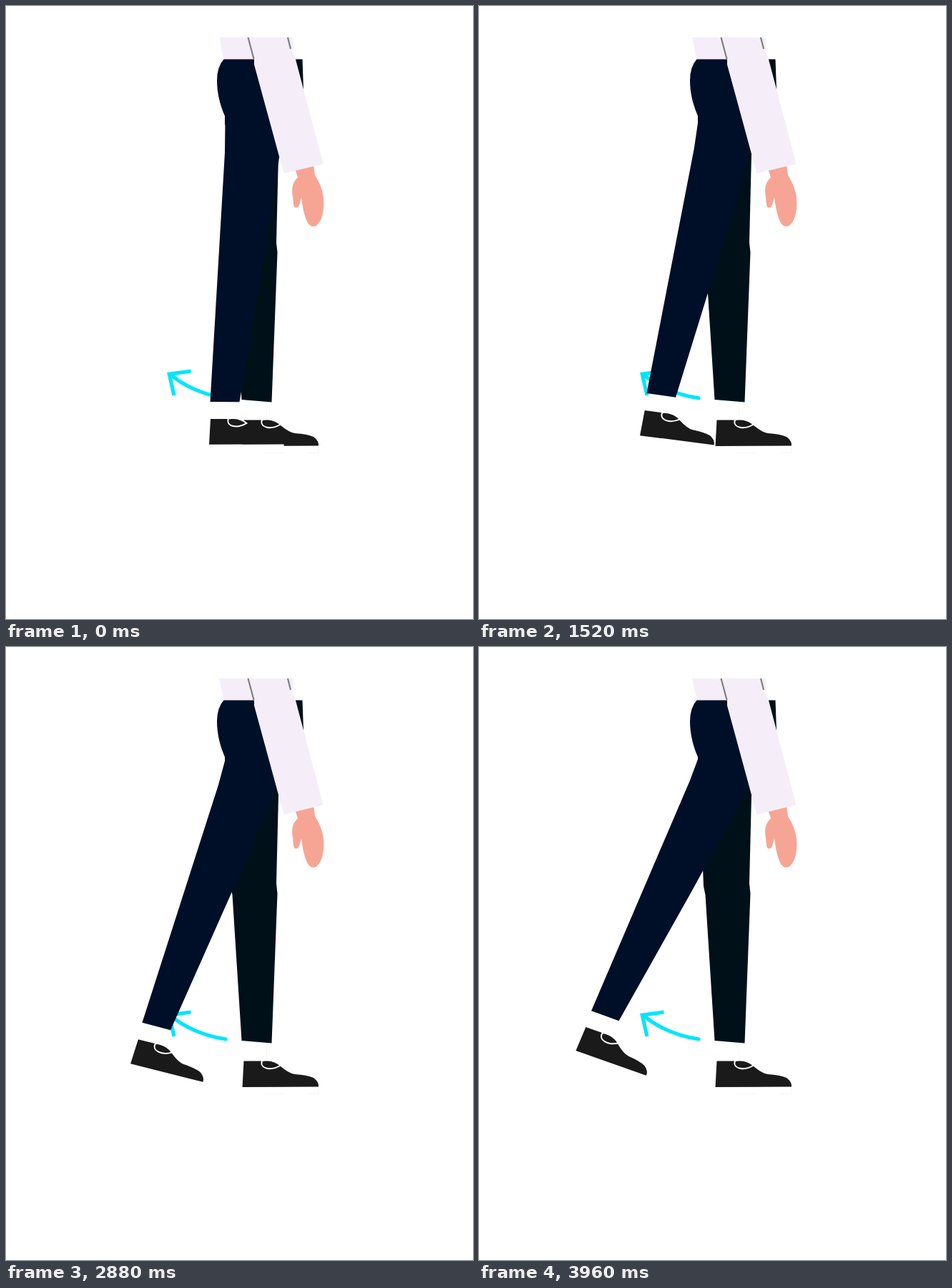
An HTML page for the animation above (4000 ms loop, 653 by 858 pixels).

```html
<!DOCTYPE html>
<html lang="en">
<head>
<meta charset="utf-8">
<title>Leg swing</title>
<style>
  html, body { margin: 0; width: 100%; height: 100%; overflow: hidden; background: #fff; }
  svg { display: block; width: 100%; height: 100%; }
</style>
</head>
<body>
<svg viewBox="0 0 653 858">
  <defs>
    <g id="shoe">
      <path fill="#fff" d="M330.5 616 L437 615.5 L438 625 L331 625.5 Z"/>
      <path fill="#1a1a1a" d="M332.5 579.5 L358 579.5 Q372 579 384 587 Q396 597 404 598 Q421 599 430 603 Q438 609 437 615.5 L330.5 616 Z"/>
      <path fill="#1a1a1a" stroke="#fff" stroke-width="2" d="M357.5 580.5 C355.5 590 370 594 384 585.5 Q376 579 366 578.5 Q358 578 357.5 580.5 Z"/>
    </g>
  </defs>

  <!-- standing leg -->
  <use href="#shoe"/>
  <path fill="none" stroke="#f5f5f5" d="M364.5 562 V577 M360 625.5 H390 M420 625.5 H437 V617"/>
  <path fill="#001018" d="M347 74.5 H414.5 L416 117 L400 170 L381 208 L378 331 L379.5 345 L371.5 554.5 L329.5 551 L316.5 347 L314 335 L313 310 L312 165 Z"/>

  <!-- arrow -->
  <g fill="none" stroke="#00e5ff" stroke-width="5.2">
    <path stroke-linecap="round" d="M307 548.8 Q262 542 230 516"/>
    <path d="M258.5 511 L228.2 515.2 L235 545"/>
  </g>

  <!-- swinging leg -->
  <g id="swing">
    <path fill="#fff" d="M293 552 H318 L316 579 H291 Z"/>
    <use href="#shoe" transform="translate(284 613.8) scale(.98) translate(-330.5 -616)"/>
    <path fill="#000f28" d="M306.5 160 L320 145 L390 160 L361.3 347 L326.5 554.3 L285.5 554 L306 205 Z"/>
  </g>

  <!-- hip, shirt, arm -->
  <path fill="#000f28" d="M304.5 74.5 H360 L376 185 L345 200 L306 166 V154 C299 138 295 121 295 104 Q295 85 304.5 74.5 Z"/>
  <path fill="#f5eef8" d="M298 44 H401.5 V64 L403 74 H304.5 Z"/>
  <path fill="#fff" d="M398 60 L401.5 64 V44 H414 V74 H404 Z"/>
  <path fill="#f6a594" d="M404.5 229 L408 240 C400 247 399 257 401 267 L402 277 C402 284 409 284 410.5 277 L413 268 C415 286 419 299 423 305 C431 314 440 305 443 290 C447 270 442 252 432 237 L430 222 Z"/>
  <path fill="#f5eef8" d="M339 44 H394 L398 60 L404 71 L443.5 221 L388.5 234.5 L347 82 V74 Z"/>
  <path fill="none" stroke="#808080" stroke-width="2.2" d="M338.5 44 L346.5 74 M394 44 L398 60"/>
</svg>
<script>
  const LOOP = 4000, STEP = 40, SWING = 20;
  const leg = document.getElementById('swing');

  function draw() {
    const time = Math.floor(performance.now() % LOOP / STEP) * STEP;
    leg.setAttribute('transform', `rotate(${SWING * time / LOOP} 349.8 163.6)`);
    requestAnimationFrame(draw);
  }
  draw();
</script>
</body>
</html>
```
